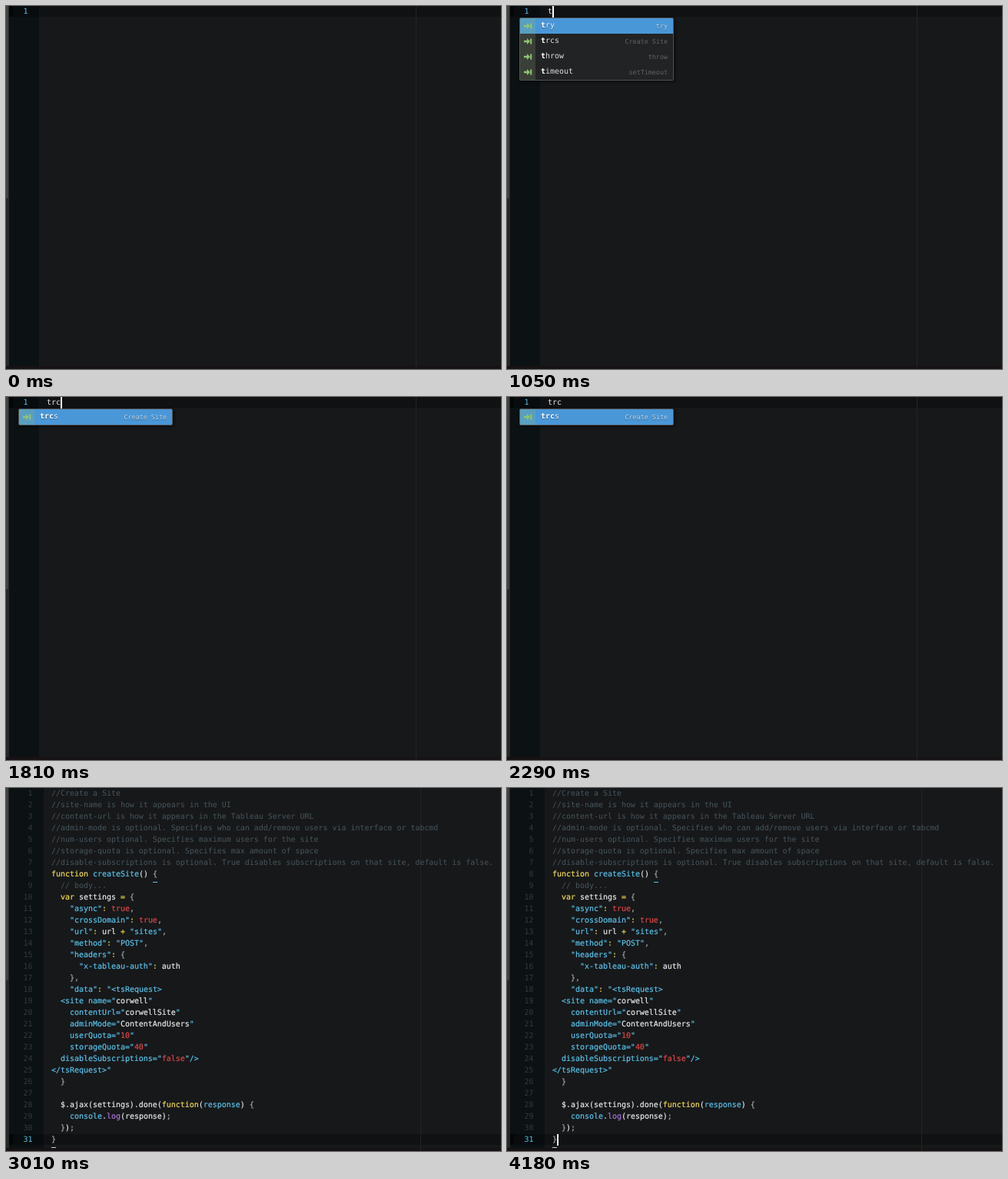
An HTML page that plays this animation: 644x472 px, repeating every 4480 ms.

```html
<!DOCTYPE html>
<html lang="en">
<head>
<meta charset="utf-8">
<style>
  html, body { margin: 0; width: 100%; height: 100%; overflow: hidden; background: #17181a; }
  body { position: relative; font: 9.967px/15px "DejaVu Sans Mono", monospace; color: #e8e9e9; text-rendering: geometricPrecision; }
  div, pre { position: absolute; margin: 0; box-sizing: border-box; }
  pre { font: inherit; top: 0; white-space: pre; }
  #map { left: 0; top: 0; width: 4px; height: 472px; background: #252827; }
  #view { left: 0; top: 0; width: 3px; height: 250px; background: #40433f; }
  #gutter { left: 4px; top: 0; height: 472px; background: #0c1114; }
  #row { left: 4px; width: 640px; height: 14px; background: rgba(0, 0, 0, .3); border-left: 5px solid #040607; }
  #ruler { top: 0; width: 1px; height: 472px; background: #212325; }
  #foot { left: 0; top: 468px; width: 644px; height: 4px; background: #171315; }
  #nums { text-align: right; color: #303a3e; left: 4px; }
  #nums u { color: #4fc0e4; text-decoration: none; }
  #code.full { -webkit-text-stroke: .2px; }
  #caret { width: 2px; height: 15px; background: #fff; }
  .brace { width: 6px; height: 1px; }
  k { color: #f2dc55; } t { color: #58c3ea; } n { color: #e04545; }
  c { color: #46565c; -webkit-text-stroke: 0; } g { color: #a3a8aa; } f { color: #a873d6; }
  #menu { left: 16px; top: 15px; width: 201px; border: 1px solid #505254; border-radius: 2px; background: #222324; box-shadow: 1px 1px 4px rgba(0, 0, 0, .7); overflow: hidden; }
  .item { position: relative; height: 20px; line-height: 20px; padding-left: 27px; color: #dcdddd; }
  .item svg { position: absolute; left: 0; top: 0; background: #3a3f37; }
  .item:first-child { background: #4a97d8; color: #eaf3fb; text-shadow: 0 1px 1px rgba(0, 0, 0, .4); }
  .item:first-child svg { background: #5a9fbf; }
  .item b { color: #fff; }
  .item em { position: absolute; right: 7px; top: 0; font-size: 8.4px; font-style: normal; color: #626465; }
  .item:first-child em { color: #c3daef; }
</style>
</head>
<body>
<div id="map"></div><div id="view"></div><div id="gutter"></div>
<div id="foot"></div><div id="row"></div><div id="ruler"></div>
<pre id="nums"></pre><pre id="code"></pre>
<div id="braces">
  <div class="brace" style="left:191px;top:122px;background:#58c3ea"></div>
  <div class="brace" style="left:59px;top:467px;background:#c8cbcc"></div>
</div>
<div id="menu"></div><div id="caret"></div>

<template id="snippet"><c>//Create a Site
//site-name is how it appears in the UI
//content-url is how it appears in the Tableau Server URL
//admin-mode is optional. Specifies who can add/remove users via interface or tabcmd
//num-users optional. Specifies maximum users for the site
//storage-quota is optional. Specifies max amount of space
//disable-subscriptions is optional. True disables subscriptions on that site, default is false.</c>
<k>function</k> <t>createSite</t>() <g>{</g>
  <c>// body...</c>
  <k>var</k> settings <k>=</k> <g>{</g>
    <t>"async"</t><k>:</k> <n>true</n><g>,</g>
    <t>"crossDomain"</t><k>:</k> <n>true</n><g>,</g>
    <t>"url"</t><k>:</k> url <k>+</k> <t>"sites"</t><g>,</g>
    <t>"method"</t><k>:</k> <t>"POST"</t><g>,</g>
    <t>"headers"</t><k>:</k> <g>{</g>
      <t>"x-tableau-auth"</t><k>:</k> auth
    <g>},</g>
    <t>"data"</t><k>:</k> <t>"&lt;tsRequest&gt;
  &lt;site name="</t>corwell<t>"
    contentUrl="</t>corwellSite<t>"
    adminMode="</t>ContentAndUsers<t>"
    userQuota="</t><n>10</n><t>"
    storageQuota="</t><n>40</n><t>"
  disableSubscriptions="</t><n>false</n><t>"/&gt;
&lt;/tsRequest&gt;"</t>
  <g>}</g>

  $.ajax(settings).done(<k>function</k>(<t>response</t>) <g>{</g>
    <t>console</t>.<f>log</f>(response)<g>;</g>
  <g>}</g>)<g>;</g>
<g>}</g></template>

<script>
const $ = id => document.getElementById(id);
const LOOP = 4480, INSERT = 2530;
const snippet = $('snippet').innerHTML;
const arrow = '<svg width="20" height="20"><path d="M5 8.7h4V6l4 4-4 4v-2.7H5zM13.2 6.5h2v7h-2z" fill="#8fc573"/></svg>';
const hints = { try: 'try', trcs: 'Create Site', throw: 'throw', timeout: 'setTimeout' };

// [start, typed text, matched prefix or '' for no menu]
const typing = [[0, '', ''], [930, 't', ''], [1050, 't', 't'], [1280, 'tr', 't'],
  [1340, 'tr', 'tr'], [1750, 'trc', 'tr'], [1810, 'trc', 'trc']];
const caretFlips = [630, 2290, 2530, 3010, 3400, 3760, 4120];

function menuHtml(prefix) {
  return Object.keys(hints).filter(word => word.startsWith(prefix)).map(word =>
    `<div class="item">${arrow}<b>${prefix}</b>${word.slice(prefix.length)}<em>${hints[word]}</em></div>`).join('');
}

function layout(full, text, prefix) {
  const shift = full ? 6 : 0, lines = full ? 31 : 1;
  $('gutter').style.width = 39 + shift + 'px';
  $('ruler').style.left = 533 + shift + 'px';
  $('nums').style.width = 24.5 + shift + 'px';
  $('nums').innerHTML = Array.from({ length: lines }, (_, i) =>
    i + 1 === lines ? `<u>${i + 1}</u>` : i + 1).join('\n');
  $('row').style.top = (lines - 1) * 15 + 'px';
  $('code').style.left = 53 + shift + 'px';
  $('code').className = full ? 'full' : '';
  $('code').innerHTML = text;
  $('braces').hidden = !full;
  $('menu').hidden = !prefix;
  $('menu').innerHTML = prefix ? menuHtml(prefix) : '';
  $('caret').style.left = (full ? 65 : 53 + text.length * 6) + 'px';
  $('caret').style.top = (lines - 1) * 15 + 'px';
}

let shown;
function draw() {
  const t = performance.now() % LOOP, full = t >= INSERT;
  const [start, text, prefix] = typing.findLast(step => t >= step[0]);
  const key = full ? INSERT : start;
  if (key !== shown) layout(full, full ? snippet : text, full ? '' : prefix);
  shown = key;
  $('caret').hidden = caretFlips.filter(flip => t >= flip).length % 2 === 0;
  requestAnimationFrame(draw);
}
draw();
</script>
</body>
</html>
```
